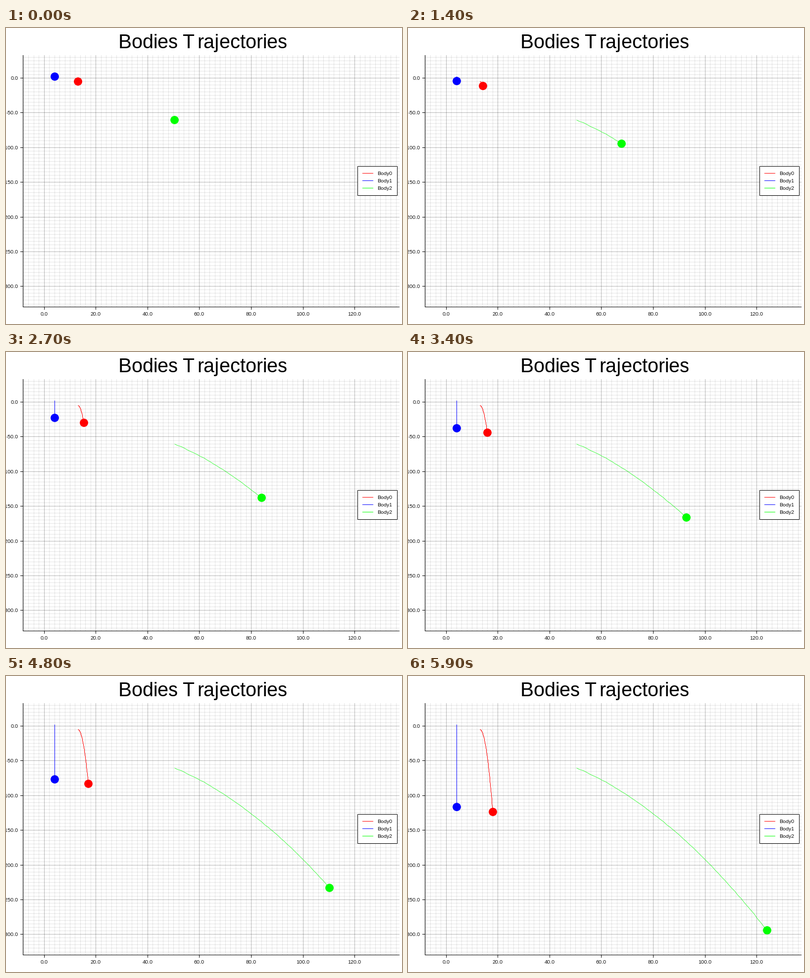
A matplotlib script for the animation above (6000 ms loop, 800 px wide and 600 px high).

```python
import numpy as np
import matplotlib.pyplot as plt
from matplotlib.animation import FuncAnimation
from matplotlib.patches import Circle, Rectangle

W, H, DPI = 800, 600, 100
FRAMES, INTERVAL = 60, 100
PX = 72 / DPI  # one pixel in points

LEFT, RIGHT, TOP, BOTTOM = 35, 795, 55, 565
X0, X_STEP = 77.2, 104.57   # pixel of x = 0 and distance of 20 units
Y0, Y_STEP = 101.6, 70.37   # pixel of y = 0 and distance of 50 units
FALL = 0.048                # shared downward acceleration

RED, BLUE, GREEN = "#ff0000", "#0000ff", "#00ff00"

plt.rcParams["font.family"] = "Liberation Sans"
plt.rcParams["text.hinting"] = "native"
plt.rcParams["text.hinting_factor"] = 1
fig = plt.figure(figsize=(W / DPI, H / DPI), dpi=DPI, facecolor="white")
ax = fig.add_axes([0, 0, 1, 1])
ax.set_xlim(0, W)
ax.set_ylim(H, 0)
ax.axis("off")


def pixel(v):
    """Centre of the pixel that holds v."""
    return np.floor(v) + 0.5


def vertical(x, top, bottom, color="black", alpha=1, z=1):
    ax.vlines(pixel(x), top, bottom, colors=color, alpha=alpha,
              linewidth=PX, zorder=z, snap=False)


def horizontal(y, left, right, color="black", alpha=1, z=1):
    ax.hlines(pixel(y), left, right, colors=color, alpha=alpha,
              linewidth=PX, zorder=z, snap=False)


def label(x, y, text, size=10, ha="left", z=7):
    ax.text(x, y, text, fontsize=size * PX, ha=ha, va="baseline", zorder=z)


def ticks(start, step, low, high):
    v = start + step * np.arange(-10, 100)
    return v[(v >= low) & (v < high)]


def draw_chart():
    vertical(ticks(X0, X_STEP / 10, LEFT, RIGHT), TOP, BOTTOM, alpha=0.1)
    horizontal(ticks(Y0, Y_STEP / 10, TOP, BOTTOM), LEFT, RIGHT, alpha=0.1)

    xs = ticks(X0, X_STEP, LEFT, RIGHT)
    ys = ticks(Y0, Y_STEP, TOP, BOTTOM)
    vertical(xs, TOP, BOTTOM, alpha=0.2, z=2)
    horizontal(ys, LEFT, RIGHT, alpha=0.2, z=2)

    vertical(34, TOP, BOTTOM + 1, z=3)
    horizontal(BOTTOM, 34, RIGHT, z=3)
    vertical(xs, BOTTOM, BOTTOM + 6, z=3)
    horizontal(ys, 29, 35, z=3)

    for i, x in enumerate(xs):
        label(np.floor(x), 583, f"{20 * i:.1f}", ha="center")
    for i, y in enumerate(ys):
        label(25, np.floor(y) + 4, f"{-50.0 * i if i else 0:.1f}", ha="right")

    # two pieces keep the pair "Tr" free of kerning
    label(227, 41, "Bodies T", size=40)
    label(386, 41, "rajectories", size=40)


def draw_legend():
    ax.add_patch(Rectangle((710.5, 280.5), 80, 59, facecolor="white",
                           edgecolor="black", linewidth=PX, zorder=6,
                           snap=False))
    for i, color in enumerate((RED, BLUE, GREEN)):
        y = 294 + 15 * i
        horizontal(y, 720, 742, color=color, z=7)
        label(750, y + 4, f"Body{i}")


class Body:
    def __init__(self, color, x, y, vx=0, vy=0, fall=FALL, weight=1):
        k = np.arange(FRAMES)
        self.x = pixel(x + vx * k)
        self.y = pixel(y + vy * k + fall * k ** 2)
        self.trail, = ax.plot([], [], color=color, linewidth=weight * PX,
                              zorder=4, solid_capstyle="butt", snap=False)
        self.dot = ax.add_patch(Circle((0, 0), 8.4, facecolor=color,
                                       edgecolor="none", zorder=5))

    def move(self, k):
        self.trail.set_data(self.x[:k + 1], self.y[:k + 1])
        self.dot.center = self.x[k], self.y[k]
        return self.trail, self.dot


draw_chart()
draw_legend()
bodies = [
    Body(RED, 145.3, 108.4, vx=0.44),
    Body(BLUE, 98.1, 98.55),
    Body(GREEN, 340.28, 186.28, vx=6.525, vy=2.76, fall=0.0479, weight=0.7),
]


def update(k):
    return [artist for body in bodies for artist in body.move(k)]


anim = FuncAnimation(fig, update, frames=FRAMES, interval=INTERVAL,
                     init_func=lambda: update(0), repeat=True,
                     repeat_delay=0, blit=False)
plt.show()
```
